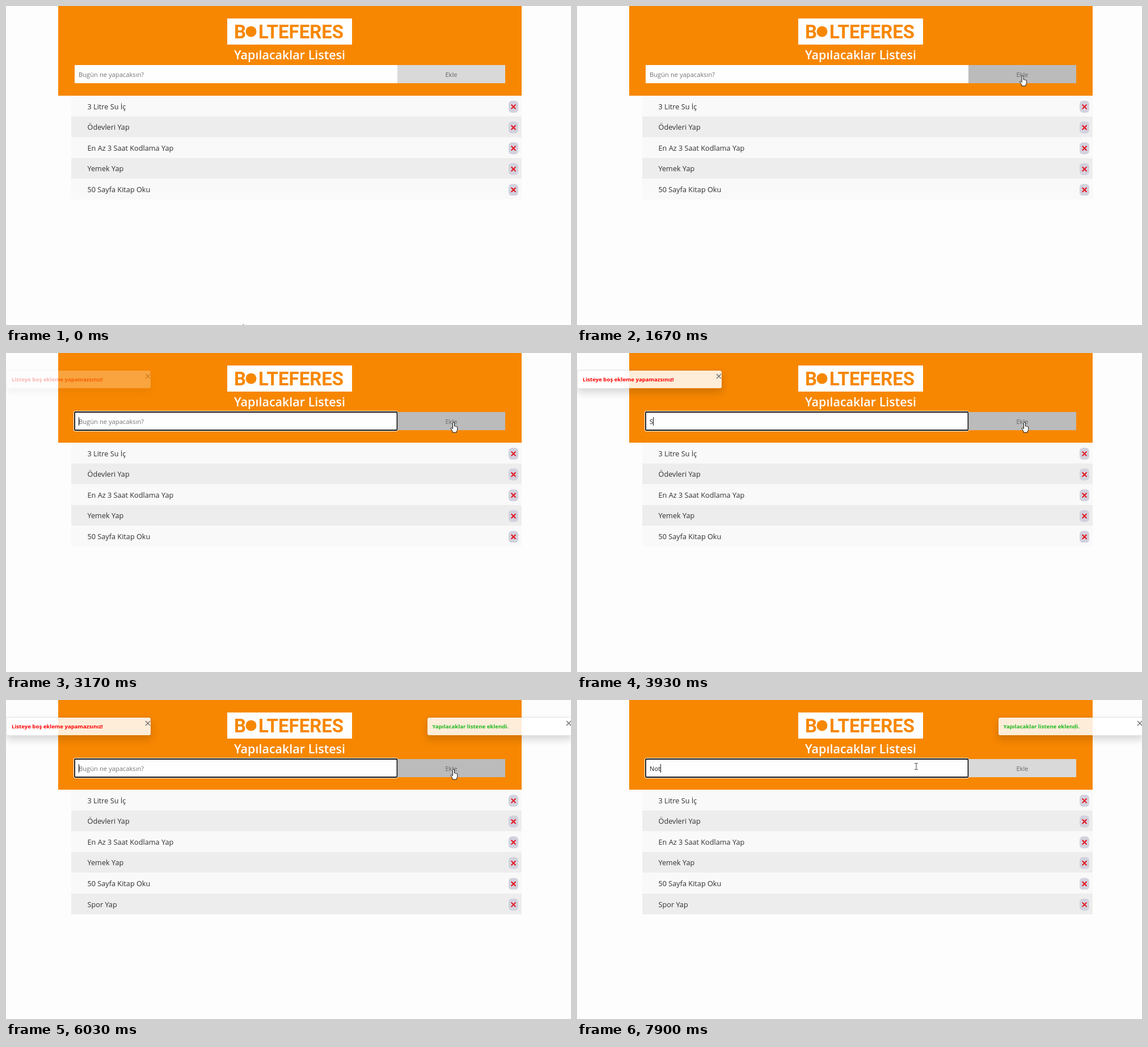
Animation of 996x562 px, one loop 8 s. Source, as an HTML page:

```html
<!DOCTYPE html>
<html lang="tr">
<head>
<meta charset="utf-8">
<title>Yapılacaklar Listesi</title>
<style>
  html, body { margin: 0; width: 100%; height: 100%; overflow: hidden; background: #fdfdfd; }
  body { position: relative; font-family: "Open Sans", "Noto Sans", sans-serif; }
  svg.stage { position: absolute; left: 0; top: 0; width: 996px; height: 562px; }
  text { white-space: pre; }

  .brand { font: 700 33px Roboto, sans-serif; fill: #f78700; }
  .title { font-size: 21.5px; font-weight: 600; fill: #fff; text-anchor: middle; }
  .field { font-size: 11.2px; fill: #222; }
  .hint { fill: #757575; }
  .add { fill: #666; text-anchor: middle; }
  .item { font-size: 12.7px; fill: #303030; }

  .toast {
    position: absolute; top: 30px; width: 256px; height: 33px; box-sizing: border-box;
    padding-left: 9px; border: 1px solid rgba(0, 0, 0, .1); border-radius: 4px;
    background: rgba(255, 255, 255, .85); background-clip: padding-box;
    box-shadow: 0 7px 14px rgba(0, 0, 0, .15);
    font-size: 9.6px; font-weight: 700; line-height: 31px; white-space: nowrap;
  }
  .toast svg { position: absolute; left: 244px; top: 5px; width: 10px; height: 10px; }
  .error { left: 0; color: #f00; animation: error 8s linear infinite; }
  .success { left: 741.5px; color: #1eb81e; animation: success 8s linear infinite; }

  .button { animation: button 8s linear infinite; }
  .hover { fill: #ddd; animation: hover 8s linear infinite both; }
  .focus { animation: focus 8s step-end infinite; }
  .added { animation: added 8s step-end infinite; }
  .pointer { animation: pointer 8s linear infinite; }

  @keyframes error {
    0%, 23.375% { opacity: 0; }
    25%, 29.41% { opacity: 1; }
    31.29% { opacity: 0; }
    33.16%, 38.31% { opacity: 1; }
    40.19% { opacity: 0; }
    42.06%, 89.99% { opacity: 1; }
    90%, 100% { opacity: 0; }
  }
  @keyframes success {
    0%, 73.375% { opacity: 0; }
    75.25%, 100% { opacity: 1; }
  }
  @keyframes button {
    0%, 17.25% { fill: #d9d9d9; }
    20.75%, 80.25% { fill: #bbb; }
    84%, 100% { fill: #d9d9d9; }
  }
  @keyframes hover {
    0%, 8.61% { opacity: 0; }
    9.22% { opacity: .24; }
    9.83%, 100% { opacity: 0; }
  }
  @keyframes focus { 0% { opacity: 0; } 23.375%, 100% { opacity: 1; } }
  @keyframes added { 0% { opacity: 0; } 72.5%, 100% { opacity: 1; } }
  @keyframes pointer {
    0%, 5% { transform: translate(418px, 560.5px); }
    12.875%, 14.625% { transform: translate(570px, 82px); }
    17.25% { transform: translate(690px, 108px); }
    20.75% { transform: translate(785px, 123px); }
    21.625%, 78.375% { transform: translate(789px, 122px); }
    80.25% { transform: translate(690px, 105px); }
    81.625% { transform: translate(640px, 100px); }
    83.375%, 100% { transform: translate(598px, 117px); }
  }
</style>
</head>
<body>
<svg class="stage" viewBox="0 0 996 562">
  <rect x="92" width="817" height="158" fill="#f78700"/>
  <rect x="390" y="22" width="220" height="46" fill="#fefefe"/>
  <g class="brand">
    <text x="402" y="57">B</text>
    <circle cx="432" cy="45" r="9.5"/>
    <text x="445" y="57">LTEFERES</text>
  </g>
  <text class="title" x="500" y="93.5">Yapılacaklar Listesi</text>

  <rect x="121" y="104" width="569" height="32" fill="#fefefe"/>
  <rect class="button" x="690" y="104" width="190" height="32"/>
  <g class="focus" fill="none">
    <rect x="119.5" y="102.5" width="571" height="35" rx="2.5" stroke="#fff"/>
    <rect x="121" y="104" width="568.5" height="32" rx="1.5" stroke="#101010" stroke-width="1.8"/>
  </g>
  <g class="field">
    <text class="hint" id="hint" x="128" y="124.5">Bugün ne yapacaksın?</text>
    <text id="typed" x="128" y="124.5"></text>
    <text class="add" x="785" y="124.5">Ekle</text>
  </g>
  <rect id="caret" y="113" width="1" height="15" fill="#111"/>

  <g id="list"></g>

  <g class="pointer" fill="#fff" stroke="#111" stroke-linejoin="round">
    <path id="arrow" d="M0 .5V14.5L3.3 11.5L5.4 16.4L7.6 15.4L5.5 10.7H10z"/>
    <path id="hand" d="M-1.5 9.5V1.5a1.5 1.5 0 0 1 3 0V7q1-1 2 .4q1-.8 1.8.5q1.2-.5 1.5.8V13q-.4 2-1.5 3.2V18H-1.8V16.5L-4.6 11.5q-.6-1.7.8-1.8q1 0 2.3 1.8z"/>
    <path id="beam" fill="none" stroke="#444" d="M-3-5.5H-1Q0-5.5 0-4.5V4.5Q0 5.5-1 5.5H-3M3-5.5H1Q0-5.5 0-4.5M3 5.5H1Q0 5.5 0 4.5"/>
  </g>
</svg>

<div class="toast error">Listeye boş ekleme yapamazsınız!
  <svg viewBox="-5 -5 10 10"><path d="M-4-4L4 4M4-4L-4 4" stroke="#777" stroke-width="1.6"/></svg>
</div>
<div class="toast success">Yapılacaklar listene eklendi.
  <svg viewBox="-5 -5 10 10"><path d="M-4-4L4 4M4-4L-4 4" stroke="#777" stroke-width="1.6"/></svg>
</div>

<script>
  const LOOP = 8000, LEFT = 128, ROW = 36.6;
  const $ = id => document.getElementById(id);

  const items = ["3 Litre Su İç", "Ödevleri Yap", "En Az 3 Saat Kodlama Yap",
    "Yemek Yap", "50 Sayfa Kitap Oku", "Spor Yap"];

  // The pointer sweeps up the first five rows, 48 ms apart.
  const row = (label, i) => `
    <g transform="translate(0 ${158 + i * ROW})" ${i === 5 ? 'class="added"' : ""}>
      <rect x="115" width="794" height="${ROW}" fill="${i % 2 ? "#ededed" : "#f9f9f9"}"/>
      ${i < 5 ? `<rect class="hover" x="115" width="794" height="${ROW}" style="animation-delay:${(4 - i) * 48}ms"/>` : ""}
      <text class="item" x="143.5" y="23.6">${label}</text>
      <rect x="886" y="9" width="17" height="21" rx="6" fill="#d2d2de"/>
      <path d="M890.7 15.6l7.8 7.8m0-7.8l-7.8 7.8" stroke="#e5101c" stroke-width="2"/>
    </g>`;
  $("list").innerHTML = items.map(row).join("");

  const entries = [
    { text: "Spor Yap", keys: [3930, 4130, 4270, 4350, 4430, 4670, 4870, 4940], end: 5800 },
    { text: "Not", keys: [7700, 7800, 7900], end: LOOP }
  ];
  const blinks = [[0, 1870], [3570, 3930], [5470, 5800], [6400, 6930], [7430, 7700]];
  const shapes = [[0, "arrow"], [689, "hand"], [930, "arrow"], [1380, "hand"], [6420, "arrow"], [6570, "beam"]];

  function typedAt(t) {
    const entry = entries.find(e => t >= e.keys[0] && t < e.end);
    return entry ? entry.text.slice(0, entry.keys.filter(k => k <= t).length) : "";
  }

  const show = (id, on) => $(id).setAttribute("visibility", on ? "visible" : "hidden");

  let start;
  function draw(now) {
    start ??= now;
    const t = (now - start) % LOOP;
    const text = typedAt(t);
    const typed = $("typed");
    if (typed.textContent !== text) typed.textContent = text;
    show("hint", !text);
    const width = text ? typed.getComputedTextLength() : 0;
    $("caret").setAttribute("x", Math.round(LEFT + width - .4));
    show("caret", !blinks.some(([from, to]) => t >= from && t < to));
    const shape = shapes.filter(([from]) => from <= t).pop()[1];
    for (const id of ["arrow", "hand", "beam"]) show(id, id === shape);
    requestAnimationFrame(draw);
  }
  requestAnimationFrame(draw);
</script>
</body>
</html>
```
